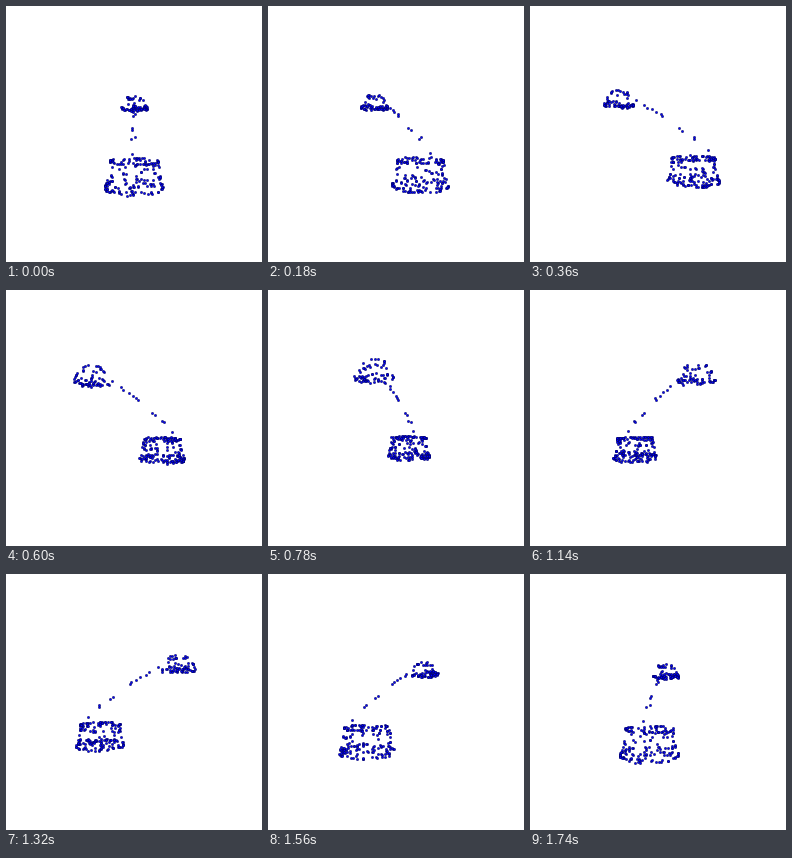
These frames come from a looping animation (256 by 256 pixels, 1.8 s). A matplotlib script:

```python
import matplotlib.pyplot as plt
import numpy as np
from matplotlib.animation import FuncAnimation

SIZE, DPI = 256, 100
FRAMES, INTERVAL = 30, 60
CENTER_X, EYE_Y = 128, 130
CAMERA = 200  # viewing distance, in pixels at unit scale
BASE_U, HEAD_U = 34.5, -43.5

rng = np.random.default_rng(12)


def ring(n, u, radius, z):
    """n points around a vertical axis at u; radius and z may be arrays."""
    a = rng.uniform(0, 2 * np.pi, n)
    return np.column_stack([u + radius * np.cos(a), radius * np.sin(a),
                            np.broadcast_to(z, n)])


def disc(n, u, radius, z):
    return ring(n, u, radius * np.sqrt(rng.uniform(0, 1, n)), z)


def lamp_base():
    t = rng.uniform(0.05, 1, 60)
    return [
        ring(34, BASE_U, 20, -20 - rng.uniform(0, 1, 34)),
        disc(12, BASE_U, 20, -20),
        ring(60, BASE_U, 20 + 4 * t**2, -20 - 22 * t),
        ring(34, BASE_U, 24, -40 - rng.uniform(0, 2.5, 34)),
        disc(32, BASE_U, 24, -42.5),
    ]


def lamp_head():
    t = rng.uniform(0.1, 0.95, 13)
    return [
        ring(28, HEAD_U, 15.5, 32 + rng.uniform(0, 3, 28)),
        disc(18, HEAD_U, 15, 33),
        ring(13, HEAD_U, 15 - 6 * t**2, 33 + 13 * t),
        ring(10, HEAD_U, 8.5, 46 + rng.uniform(-1, 1, 10)),
    ]


ARM = np.array([
    (-24, 0, 37), (-15, -1, 32), (-12, 0.5, 29), (-6, 0, 27),
    (-2, -1, 24), (3, 0.5, 22), (4, -1, 20), (21.3, -1.5, 7.5),
    (24.9, -2, 5.2), (35.8, 1, -1.2), (36.3, -2.3, -2.7),
    (48.4, -1.5, -13.3),
])

points = np.vstack([*lamp_base(), *lamp_head(), ARM])


def project(angle):
    u, w, z = points.T
    x = u * np.sin(angle) + w * np.cos(angle)
    near = u * np.cos(angle) - w * np.sin(angle)
    scale = CAMERA / (CAMERA - near)
    return np.column_stack([CENTER_X + x * scale, EYE_Y - z * scale])


fig = plt.figure(figsize=(SIZE / DPI, SIZE / DPI), dpi=DPI, facecolor="white")
ax = fig.add_axes([0, 0, 1, 1])
ax.set(xlim=(0, SIZE), ylim=(SIZE, 0))
ax.axis("off")

dots = ax.scatter(*project(0).T, s=2.6, c="#0000ff",
                  edgecolors="#000050", linewidths=0.35)


def update(i):
    dots.set_offsets(project(2 * np.pi * i / FRAMES))
    return (dots,)


anim = FuncAnimation(fig, update, frames=FRAMES, interval=INTERVAL,
                     repeat=True, repeat_delay=0)
plt.show()
```
